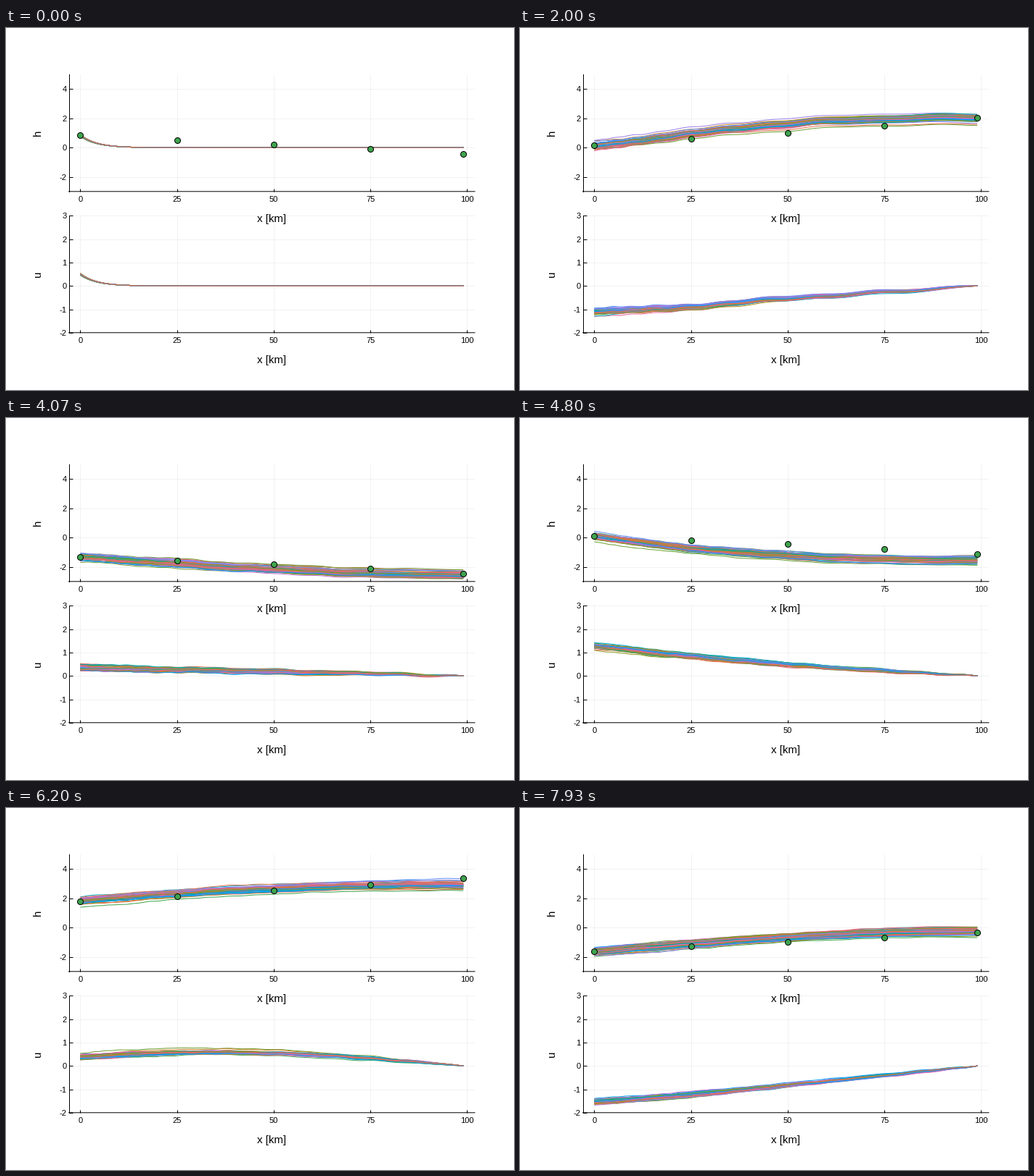
These frames come from a looping animation (700x500 px, 8 s). A matplotlib script:

```python
import numpy as np
import matplotlib.pyplot as plt
from matplotlib.animation import FuncAnimation
from matplotlib.collections import LineCollection

plt.rcParams["font.family"] = "Liberation Sans"
plt.rcParams["axes.unicode_minus"] = False

W, H, DPI = 700, 500, 100
PX = 72 / DPI
FRAMES, LOOP_MS = 120, 8000
MEMBERS, CELLS = 50, 100
TIDE_STEPS = 75.5
GAUGE_X = np.array([0, 25, 50, 75, 99])
PALETTE = ["#009AFA", "#E36F47", "#3EA44E", "#C371D2", "#AC8E18", "#00AAAE",
           "#ED5E93", "#C68225", "#00A98D", "#8E971E", "#00A9CC", "#9B7FE9",
           "#618DF6", "#F06073", "#DD65B6", "#6C9F33"]


def tide(x, k):
    """Water level at x km: tidal harmonics that grow and lag inland."""
    s = x / 99
    theta = 360 * k / TIDE_STEPS

    def wave(order, amp, peak):
        return amp * np.cos(np.radians(order * (theta - peak)))

    return (-0.03 + 0.33 * s
            + wave(0.5, 0.1, 405)
            + wave(1, 2.05 + 0.8 * s ** 2, 61 + 38 * s ** 0.85)
            + wave(2, 0.28, 45 + 20 * s)
            + wave(3, 0.25 * (1 - s), 33))


def boundary_noise(sigma=0.165, memory=36):
    """AR(1) disturbance of the sea level, one column per member."""
    rng = np.random.default_rng(12)
    alpha = np.exp(-1 / memory)
    kicks = rng.normal(0, sigma * np.sqrt(1 - alpha ** 2), (FRAMES, MEMBERS))
    kicks -= kicks.mean(axis=1, keepdims=True)
    noise = np.zeros((FRAMES, MEMBERS))
    state = np.zeros(MEMBERS)
    for k in range(FRAMES):
        state = alpha * state + kicks[k]
        noise[k] = state
    return noise


def simulate(sea):
    """Linear shallow water in a closed channel, Crank-Nicolson in time."""
    g, depth, dt = 9.81, 20.0, 600.0
    damping = 1 / (0.06 * 86400)
    dx = 100e3 / (CELLS + 0.5)
    size = 2 * CELLS
    rate = np.zeros((size, size))
    for i in range(1, size - 1):
        pull = (g if i % 2 else depth) / dx
        rate[i, i - 1], rate[i, i + 1] = pull, -pull
        if i % 2:
            rate[i, i] = -damping
    left = np.eye(size) - 0.5 * dt * rate
    right = np.eye(size) + 0.5 * dt * rate
    right[0] = right[-1] = 0
    step = np.linalg.solve(left, right)
    inflow = np.linalg.solve(left, np.eye(size)[:, :1])

    state = np.zeros((size, MEMBERS))
    runs = np.zeros((FRAMES, size, MEMBERS))
    for k in range(FRAMES):
        state = step @ state + inflow * sea[k]
        runs[k] = state
    return runs[:, 0::2], runs[:, 1::2]


steps = np.arange(FRAMES)[:, None]
level, speed = simulate(tide(0, steps) + boundary_noise())
x = np.linspace(0, 99, CELLS)

fig = plt.figure(figsize=(W / DPI, H / DPI), dpi=DPI, facecolor="white")


def panel(top, bottom, ylim, yticks, name):
    ax = fig.add_axes([86.5 / W, 1 - bottom / H, 559.5 / W, (bottom - top) / H])
    ax.set(xlim=(-2.97, 101.97), ylim=ylim, xticks=range(0, 101, 25), yticks=yticks)
    ax.set_axisbelow(True)
    ax.grid(color="black", alpha=0.1, lw=0.5 * PX)
    ax.spines[["top", "right"]].set_visible(False)
    for side in ("left", "bottom"):
        ax.spines[side].set_linewidth(PX)
    ax.spines["bottom"].set_snap(False)
    ax.tick_params(direction="in", length=4.5 * PX, width=PX, labelsize=11.1 * PX)
    ax.tick_params(axis="x", pad=6.5 * PX)
    ax.tick_params(axis="y", pad=3 * PX)
    label = dict(fontsize=15 * PX, ha="center", va="center")
    fig.text(366.5 / W, 1 - (bottom + 38.2) / H, "x [km]", **label)
    fig.text(44 / W, 1 - (top + bottom) / 2 / H, name, rotation=90, **label)
    lines = LineCollection([], colors=PALETTE, linewidths=PX, zorder=3)
    lines.set_snap(False)
    ax.add_collection(lines, autolim=False)
    return ax, lines


ax_h, lines_h = panel(64.2, 225.8, (-3, 5), range(-2, 5, 2), "h")
ax_u, lines_u = panel(259.4, 420.8, (-2, 3), range(-2, 4), "u")
dots, = ax_h.plot([], [], "o", ms=8 * PX, mfc=PALETTE[2], mec="black",
                  mew=PX, zorder=4)


def curves(values):
    return [np.column_stack([x, row]) for row in values.T]


def draw(k):
    lines_h.set_segments(curves(level[k]))
    lines_u.set_segments(curves(speed[k]))
    dots.set_data(GAUGE_X, tide(GAUGE_X, k))
    return lines_h, lines_u, dots


anim = FuncAnimation(fig, draw, frames=FRAMES, init_func=lambda: draw(0),
                     interval=LOOP_MS / FRAMES, repeat=True)
plt.show()
```
